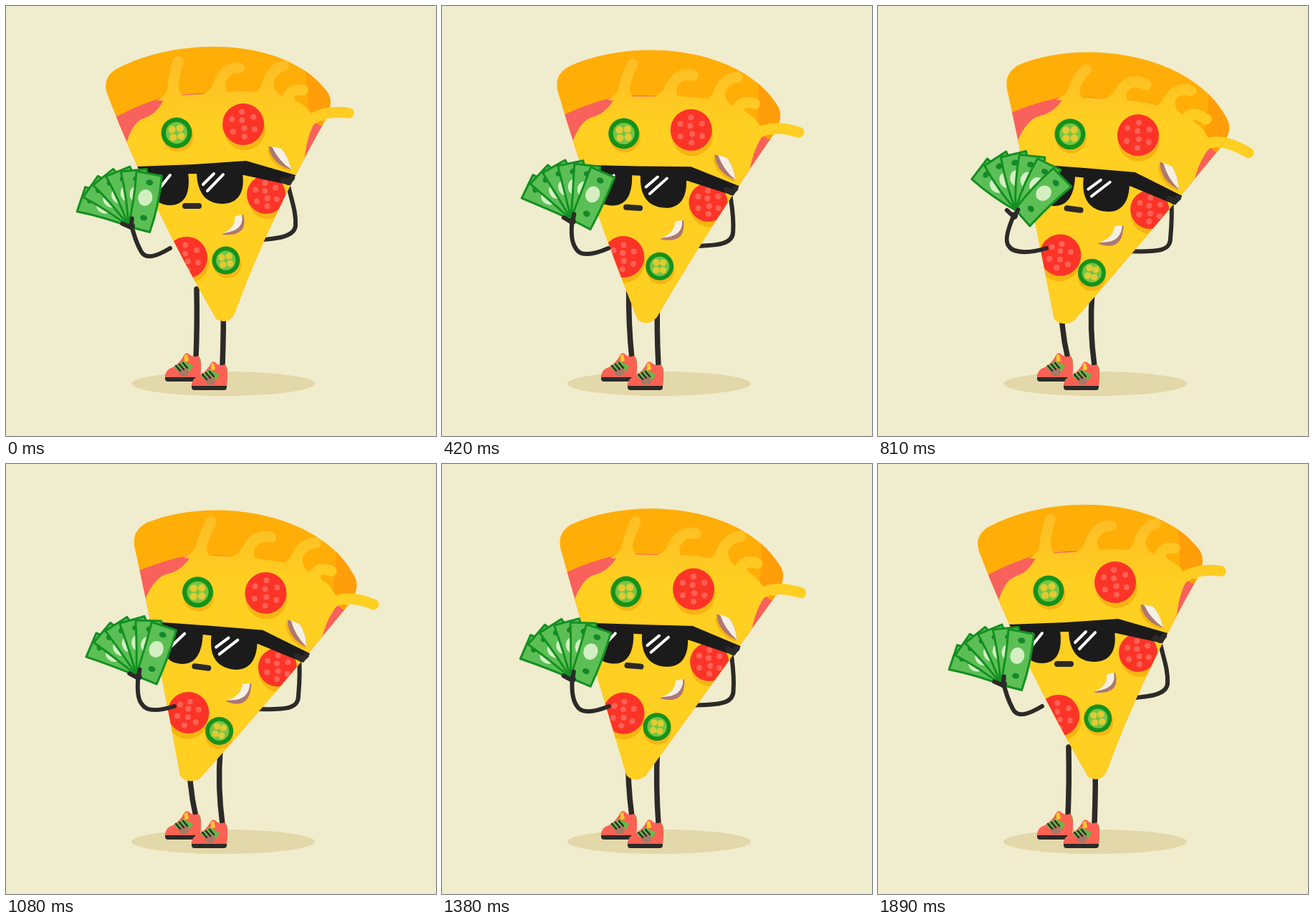
Animation of 600 by 600 pixels, one loop 1920 ms. Source, as an HTML page with a canvas:

```html
<!DOCTYPE html>
<html>
<head>
<meta charset="utf-8">
<style>
html, body { margin: 0; height: 100%; overflow: hidden; background: #f0ecce }
canvas { display: block }
</style>
</head>
<body>
<canvas id="c" width="600" height="600"></canvas>
<script>
const g = document.getElementById('c').getContext('2d');
const TAU = Math.PI * 2, DEG = TAU / 360;
const INK = '#2c2a28', BLACK = '#1c1b1b', RED = '#fc3428', SHADE = '#f7b512', PEEL = '#ad7872', WHITE = '#f5f0e4';

const cheese = g.createLinearGradient(0, 85, 0, 165);
cheese.addColorStop(0, '#fdbf25');
cheese.addColorStop(1, '#ffcf21');

// Each drip: base, bend and tip
const drips = [
  [231, 132, 233, 100, 240, 77],
  [292, 126, 300, 84, 325, 86],
  [361, 126, 366, 88, 387, 83],
  [391, 142, 390, 114, 414, 117],
  [424, 160, 444, 145, 478, 149]
];

let lean, bend, wave;

const mix = (a, b, m) => a + (b - a) * m;

function sway(t) {
  const s = (1 - Math.cos(TAU * (t + 15) / 1890)) / 2;
  return s * (1.35 - .3 * s);
}

// Leans the slice; the tip swings further and a little later
function warp(x, y) {
  const low = Math.max(0, y - 300), tip = Math.max(0, y - 353), d = x - 240;
  const turn = Math.min(1, low / 50) * (x - 282);
  return [
    x + lean * (57.4 - .158 * y) - bend * (.0019 * low * low + .18 * turn),
    y + lean * (2 + .12 * d + .00025 * d * d) + bend * (.24 * turn - .002 * tip * tip)
  ];
}

// Path from SVG data whose points follow the lean
const bent = data => new Path2D(data.replace(/([-\d.]+) ([-\d.]+)/g, (_, x, y) => warp(+x, +y).join(' ')));

function fill(color, path) {
  g.fillStyle = color;
  g.fill(path);
}

function stroke(color, width, path) {
  g.strokeStyle = color;
  g.lineWidth = width;
  g.stroke(path);
}

function oval(color, x, y, rx, ry = rx) {
  g.fillStyle = color;
  g.beginPath();
  g.ellipse(x, y, rx, ry, 0, 0, TAU);
  g.fill();
}

const disc = (color, x, y, r) => oval(color, ...warp(x, y), r);

function ring(n, color, x, y, far, r) {
  for (let i = 0; i < n; i++) {
    const a = TAU * (i + .4) / n;
    disc(color, x + far * Math.cos(a), y + far * Math.sin(a), r);
  }
}

function pepperoni(x, y, r) {
  disc(SHADE, x + 2, y + 7, r);
  disc(RED, x, y, r);
  ring(6, '#fb6256', x, y, r * .6, 4);
  ring(2, '#fb6256', x, y, r * .2, 4);
}

function cucumber(x, y, r) {
  disc(SHADE, x + 2, y + 5, r);
  disc('#15921a', x, y, r);
  disc('#74c544', x, y, r * .7);
  ring(4, '#e2cb32', x, y, r * .37, r * .24);
}

function shoe(x, y) {
  g.save();
  g.translate(x, y);
  fill(INK, new Path2D('M0 31H49V36Q49 40 45 40H4Q0 40 0 36Z'));
  fill('#5fb645', new Path2D('M45 4Q51 6 50 18L42 14Z'));
  fill('#fd6153', new Path2D('M0 34Q0 23 11 20Q22 13 27 2Q31 -2 35 3Q40 7 47 4Q52 14 49 34Z'));
  fill('#ffcf21', new Path2D('M27 3L31 2L33 11L27 13Z'));
  fill('#67b747', new Path2D('M12 20L25 11L39 18L35 26L27 20L19 26Z'));
  oval('#a87966', 26, 27, 7, 6);
  for (let i = 0; i < 3; i++)
    stroke(INK, 2.4, new Path2D(`M${15 + i * 5} ${18 - i * 2}l6 7`));
  g.restore();
}

function limbs() {
  const p = (x, y, dx, dy) => `${x + lean * dx} ${y + lean * dy} `;
  stroke(INK, 7.5, new Path2D('M' + p(266, 395, -10, 0) + 'Q' + p(267, 445, -13, 0) + '265 492'));
  stroke(INK, 7.5, new Path2D('M' + p(303, 400, -4, 0) + 'Q' + p(304, 450, -9, 0) + '302 502'));
  stroke(INK, 6, new Path2D('M' + p(342, 327, 10, 15) + 'C' + p(380, 325, 15, 18) + p(403, 322, 5, 18) +
    p(404, 306, 4, 17) + 'C' + p(405, 285, 5, 15) + p(397, 268, 13, 17) + p(393, 246, 16, 24)));
}

function drip([bx, by, cx, cy, tx, ty], ease) {
  const x = tx + 6 * ease, y = ty + 9 * ease, mx = (bx + 2 * cx + x) / 4, my = (by + 2 * cy + y) / 4;
  stroke(cheese, 15, bent(`M${bx} ${by}Q${cx} ${cy} ${x} ${y}`));
  fill(cheese, bent(`M${bx - 20} ${by}Q${bx - 5} ${by - 8} ${mx - 5} ${my}L${mx + 5} ${my}` +
    `Q${bx + 8} ${by - 8} ${bx + 24} ${by}Z`));
}

function body() {
  const shape = bent('M142 125Q133 102 152 89C235 43 386 41 446 117Q460 132 445 160' +
    'Q366 300 320 428Q312 446 294 437Q200 275 142 125Z');
  const m = (1 - wave) / 2, ease = m * m * (3 - 2 * m);
  fill('#ffae08', shape);
  g.save();
  g.clip(shape);
  fill('#ff9e08', bent('M412 70Q424 105 420 165L480 190L480 90Z'));
  fill('#f9615c', bent('M130 168Q180 138 222 127Q320 108 420 154L438 167L470 165L450 260L150 230Z'));
  fill(cheese, bent('M164 210Q172 162 194 156Q213 149 222 126Q250 124 272 123Q330 116 372 122' +
    'Q430 135 430 164Q416 190 416 230L400 250L500 470L200 470L100 220Z'));
  g.restore();
  drips.forEach(d => drip(d, ease));

  g.save();
  g.clip(shape);
  pepperoni(331, 165, 29);
  pepperoni(363, 263, 27);
  pepperoni(252, 351, 29);
  g.restore();
  cucumber(238, 177, 21.5);
  cucumber(307, 355, 19.5);
  fill(SHADE, bent('M364 200Q370 226 398 231L392 215Z'));
  fill(PEEL, bent('M366 196L384 199Q394 210 398 228Q372 222 366 196Z'));
  fill(WHITE, bent('M371 196L384 199Q394 210 398 228Q380 216 371 196Z'));
  fill(PEEL, bent('M331 291Q340 322 301 319Q322 310 321 294Z'));
  fill(WHITE, bent('M329 291Q334 313 303 317Q321 309 319 294Z'));
}

function face() {
  fill(BLACK, bent('M183 224L262 221L335 216L404 236L397 250L332 236L266 234L190 235Z'));
  fill(BLACK, bent('M199 233L254 232C258 262 249 278 229 278C208 278 199 262 199 233Z'));
  fill(BLACK, bent('M266 233L330 234C334 262 322 276 302 276C280 276 267 262 266 233Z'));
  stroke('#fff', 4, bent('M205 248L215 237M209 261L229 236M275 249L290 234M281 258L303 235'));
  stroke(INK, 8, bent('M250 279L269 279'));
  stroke(INK, 8, bent('M387 243L394 246L399 240'));
}

function bill(x, y, turn) {
  const curl = -5 * wave, mid = 12 - curl / 2;
  g.save();
  g.translate(x, y);
  g.rotate(turn);
  const shape = new Path2D(`M-2 2Q${-4 - curl} -36 -5 -76L31 -76Q${31 - curl} -36 29 4Z`);
  fill('#5cbf55', shape);
  stroke('#129021', 3, shape);
  oval('#d3efc2', mid, -42, 10, 11.5);
  oval('#16882a', mid + 2, -64, 5, 4);
  oval('#16882a', mid + 3, -14, 5, 4);
  g.restore();
}

function moneyArm() {
  const x = 172 + 4.5 * (1 - wave) + 8 * lean, y = 306 - 3.5 * (1 - wave) - 9 * lean;
  const back = -62 - 12 * wave, front = 28 - 22 * wave, elbow = 182 + 6 * wave + 4 * lean;
  stroke(INK, 6, new Path2D(`M${229 + 6 * lean} 338C${212 + 4 * lean} ${348 - 4 * lean} ${elbow + 8} ` +
    `${356 - 9 * lean} ${elbow + 1} ${341 - 6 * lean}Q${elbow - 7} 326 ${x + 2} ${y}`));
  for (let i = 0; i < 6; i++)
    bill(x + 3 - 4 * wave, y - 3 + 5 * wave, mix(back, front, i / 5) * DEG);
  for (const side of [-45, 45]) {
    const a = ((back + front) / 2 + side) * DEG;
    stroke(INK, 6, new Path2D(`M${x + 2} ${y + 4}L${x + 11 * Math.sin(a)} ${y + 1 - 10 * Math.cos(a)}`));
  }
  oval(INK, x + 2, y + 2, 5);
}

function draw(now) {
  const t = Math.floor(now % 1920 / 30) * 30;
  lean = sway(t);
  bend = sway(t - 80);
  wave = Math.cos(TAU * (t - 50) / 472.5);
  g.lineCap = g.lineJoin = 'round';
  g.fillStyle = '#f0ecce';
  g.fillRect(0, 0, 600, 600);
  oval('#e3d8a9', 303, 527, 128, 17);
  limbs();
  shoe(222, 484);
  shoe(259, 496);
  body();
  face();
  moneyArm();
}

const start = performance.now();
function tick() {
  draw(performance.now() - start);
  requestAnimationFrame(tick);
}
tick();
</script>
</body>
</html>
```
